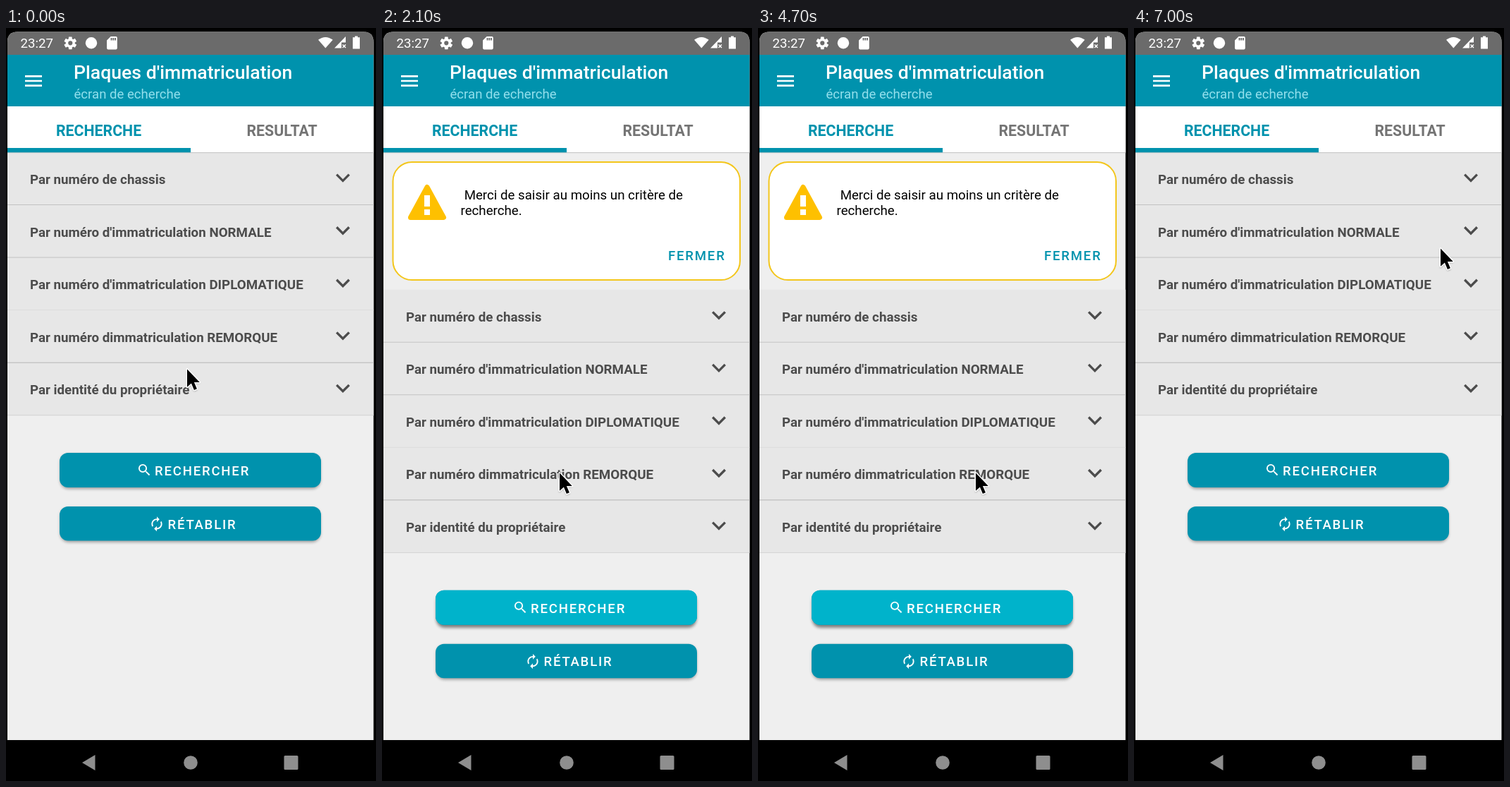
Animation, 525 px wide and 1067 px high, one loop 7200 ms. Source, as an HTML page:

```html
<!DOCTYPE html>
<html lang="fr">
<head>
<meta charset="utf-8">
<title>Plaques d'immatriculation</title>
<style>
html, body { margin: 0; width: 100%; height: 100%; overflow: hidden; background: #000; }
svg { display: block; width: 100vw; height: 100vh; font-family: Roboto, sans-serif; }
text { white-space: pre; }
.tab { font-size: 21.3px; font-weight: 700; }
.row { font-size: 18.75px; font-weight: 700; fill: #4c4c4c; }
.btn { font-size: 18.6px; font-weight: 500; letter-spacing: 1.8px; }
.msg { font-size: 18.7px; fill: #000; }
</style>
</head>
<body>
<svg viewBox="0 0 525 1067">
  <defs>
    <clipPath id="searchClip"><rect x="76" y="602" width="371" height="49" rx="12"/></clipPath>
    <clipPath id="closeClip"><rect x="395.5" y="297" width="101.5" height="49" rx="4.5"/></clipPath>
    <filter id="blur" x="-20%" y="-60%" width="140%" height="220%"><feGaussianBlur stdDeviation="2"/></filter>
    <filter id="soft" x="-50%" y="-50%" width="200%" height="200%"><feGaussianBlur stdDeviation="1.3"/></filter>
    <path id="chevron" d="M7.41 8.58 12 13.17l4.59-4.59L18 10l-6 6-6-6z" fill="#4c4c4c"/>
  </defs>

  <rect width="525" height="1067"/>
  <path d="M2 1009V20Q2 5.500 16 5.500H507.500Q521.500 5.500 521.500 20V1009z" fill="#efefef"/>

  <g id="body">
    <rect x="2" y="176" width="519.5" height="373" fill="#e7e7e7"/>
    <g id="rows"></g>
    <rect id="lift" x="77" y="605" width="369" height="49" rx="12" fill="#000" filter="url(#blur)"/>
    <rect x="77" y="680" width="369" height="48.500" rx="12" fill="#000" opacity=".36" filter="url(#blur)"/>
    <g fill="#0092ad">
      <rect x="76" y="602" width="371" height="49" rx="12"/>
      <rect x="76" y="678" width="371" height="48.500" rx="12"/>
    </g>
    <g clip-path="url(#searchClip)"><circle id="searchWave" fill="#00b3cb"/></g>
    <g fill="#fff">
      <path transform="translate(185.200 615.200) scale(.93)" d="M15.500 14h-.79l-.28-.27A6.470 6.470 0 0 0 16 9.500 6.500 6.500 0 1 0 9.500 16c1.610 0 3.090-.59 4.230-1.570l.27.28v.79l5 4.990L20.490 19l-4.990-5zm-6 0C7.010 14 5 11.990 5 9.500S7.010 5 9.500 5 14 7.010 14 9.500 11.990 14 9.500 14z"/>
      <path transform="translate(202.600 691.400) scale(.95)" d="M12 6v3l4-4-4-4v3c-4.420 0-8 3.580-8 8 0 1.570.46 3.030 1.240 4.260L6.700 14.800A5.870 5.870 0 0 1 6 12c0-3.310 2.690-6 6-6zm6.760 1.740L17.300 9.200c.44.84.7 1.790.7 2.800 0 3.310-2.690 6-6 6v-3l-4 4 4 4v-3c4.420 0 8-3.580 8-8 0-1.570-.46-3.030-1.240-4.260z"/>
      <text class="btn" x="211" y="634">RECHERCHER</text>
      <text class="btn" x="229.500" y="709.500">RÉTABLIR</text>
    </g>
  </g>

  <g id="alert">
    <rect x="15.500" y="190" width="492.500" height="167" rx="27" fill="#fff" stroke="#f3c61c" stroke-width="2"/>
    <path d="M64 225.500 87.500 268.500H40.500z" fill="#fec000" stroke="#fec000" stroke-width="7" stroke-linejoin="round"/>
    <path d="M60 237h8v16h-8zM60 257h8v8h-8z" fill="#fff"/>
    <text class="msg" x="112" y="243"> Merci de saisir au moins un critère de</text>
    <text class="msg" x="111.500" y="265">recherche.</text>
    <g clip-path="url(#closeClip)"><circle id="closeWave" fill="#97dce4"/></g>
    <text class="btn" x="406" y="329" fill="#0092ad">FERMER</text>
  </g>

  <path d="M2 38V20Q2 5.500 16 5.500H507.500Q521.500 5.500 521.500 20V38z" fill="#6b6b6b"/>
  <rect x="2" y="38" width="519.5" height="73" fill="#0092ad"/>
  <rect x="2" y="111" width="519.5" height="65" fill="#fff"/>
  <rect x="2" y="176" width="519.5" height="1.200" fill="#c9c9c9"/>
  <rect x="2" y="170" width="260" height="6.300" fill="#0092ad"/>

  <g fill="#fff">
    <text x="20.500" y="28" font-size="18.700">23:27</text>
    <g id="gear" transform="translate(91.300 21.300)"></g>
    <circle cx="121" cy="21.200" r="8.200"/>
    <path transform="translate(139.400 10.200) scale(.92)" d="M18 2h-8L4 8v12c0 1.100.9 2 2 2h12c1.100 0 2-.9 2-2V4c0-1.100-.9-2-2-2zm-6 6h-2V4h2zm3 0h-2V4h2zm3 0h-2V4h2z"/>
    <path d="M443 16.800Q453.300 9 463.700 16.800L453.300 28.500z"/>
    <path d="M482 12V20.500H476V28.500H466z"/>
    <path d="M477.500 23.500 482 28M482 23.500 477.500 28" stroke="#fff" stroke-width="1.500"/>
    <path d="M495 11.500h4v1.800h3V29.500h-10V13.300h3z"/>
    <path transform="translate(23 59) scale(1.333)" d="M3 18h18v-2H3zm0-5h18v-2H3zm0-7v2h18V6z"/>
    <text x="96" y="72" font-size="26.600" font-weight="500">Plaques d'immatriculation</text>
    <text x="96.500" y="99.500" font-size="18.600" fill="#92dfec">écran de echerche</text>
  </g>
  <text class="tab" x="71" y="152.500" fill="#0092ad">RECHERCHE</text>
  <text class="tab" x="341.500" y="152.500" fill="#747474">RESULTAT</text>

  <rect x="0" y="1009" width="525" height="58"/>
  <g fill="#8e8e8e">
    <path d="M108 1041 126.500 1030V1052z"/>
    <circle cx="262" cy="1041" r="9.800"/>
    <rect x="394.500" y="1031" width="20" height="20" rx="1.500"/>
  </g>

  <g id="cursor">
    <path d="M.5 2V29.500L6.700 23.500 10.700 33 15.700 31 11.700 21.500H19.500z" opacity=".4" filter="url(#soft)"/>
    <path d="M1 1.500V26.800L6.900 21.400 10.900 31 14.900 29.300 10.900 20H18.800z" stroke="#fff" stroke-width="3" stroke-linejoin="round" paint-order="stroke"/>
  </g>
</svg>
<script>
const LOOP = 7200, STEP = 100, SHIFT = 194.7;
const $ = id => document.getElementById(id);

const labels = ["de chassis", "d'immatriculation NORMALE", "d'immatriculation DIPLOMATIQUE", "dimmatriculation REMORQUE"]
  .map(s => "Par numéro " + s).concat("Par identité du propriétaire");
const lines = ["#c2c2c2", "#c2c2c2", "#dcdcdc", "#b6b6b6", "#d3d3d3"];
$("rows").innerHTML = labels.map((label, i) => {
  const y = i * 74.55;
  return `<text class="row" x="34" y="${221 + y}">${label}</text>
    <use href="#chevron" transform="translate(458 ${192.2 + y}) scale(1.667)"/>
    <rect x="2" y="${250 + y}" width="519.5" height="1" fill="${lines[i]}"/>`;
}).join("");

let gear = "";
for (let a = 0; a < 360; a += 60)
  gear += `<rect x="-2.4" y="-8.9" width="4.8" height="5" rx=".6" transform="rotate(${a})"/>`;
$("gear").innerHTML = gear + '<circle r="4.8" fill="none" stroke="#fff" stroke-width="3.4"/>';

// time, x, y of the pointer tip
const path = [
  [0, 256, 482], [800, 277, 634], [1100, 277, 634], [1400, 262, 622], [1600, 251, 629],
  [2300, 251, 629], [2800, 340, 470], [3200, 387, 389], [3500, 434, 311], [3700, 434, 311],
  [3900, 397, 480], [4200, 308, 629], [4900, 308, 629], [5400, 395, 430], [5500, 395, 430],
  [6000, 434, 311], [LOOP, 434, 311]
];
const shown = [[2000, 3700], [4700, 6700]];
const searches = [[1800, 2100], [4500, 4750]];
const closes = [[3500, 3700], [6400, 6700]];

const clamp = v => Math.max(0, Math.min(1, v));
const mix = (a, b, k) => a + (b - a) * k;

function pointer(t) {
  const i = path.findIndex((p, n) => n && t <= p[0]);
  const a = path[i - 1], b = path[i], k = (t - a[0]) / (b[0] - a[0]);
  return [mix(a[1], b[1], k), mix(a[2], b[2], k)];
}

// growing circle that drifts to the centre, then fades after release
function ripple(el, t, presses, from, to, size) {
  const press = presses.find(([down, up]) => t >= down && t < up + 300);
  if (!press) { el.setAttribute("opacity", 0); return 0; }
  const k = Math.sin(clamp((t - press[0]) / 150) * Math.PI / 2);
  const alpha = 1 - clamp((t - press[1]) / 300);
  el.setAttribute("cx", mix(from[0], to[0], k));
  el.setAttribute("cy", mix(from[1], to[1], k));
  el.setAttribute("r", size * mix(.3, 1, k));
  el.setAttribute("opacity", alpha);
  return alpha * k;
}

function draw(time) {
  const t = Math.floor(time % LOOP / STEP) * STEP;
  const open = shown.some(([a, b]) => t >= a && t < b);
  $("alert").style.display = open ? "" : "none";
  $("body").setAttribute("transform", `translate(0 ${open ? SHIFT : 0})`);
  const glow = ripple($("searchWave"), t, searches, [278, 628], [262, 626.5], 197);
  ripple($("closeWave"), t, closes, [436, 315], [446, 321.5], 64);
  $("lift").setAttribute("opacity", mix(.36, .48, glow));
  $("lift").setAttribute("y", mix(604, 606, glow));
  $("cursor").setAttribute("transform", `translate(${pointer(t)})`);
}

const start = performance.now();
function tick() {
  draw(performance.now() - start);
  requestAnimationFrame(tick);
}
draw(0);
requestAnimationFrame(tick);
</script>
</body>
</html>
```
